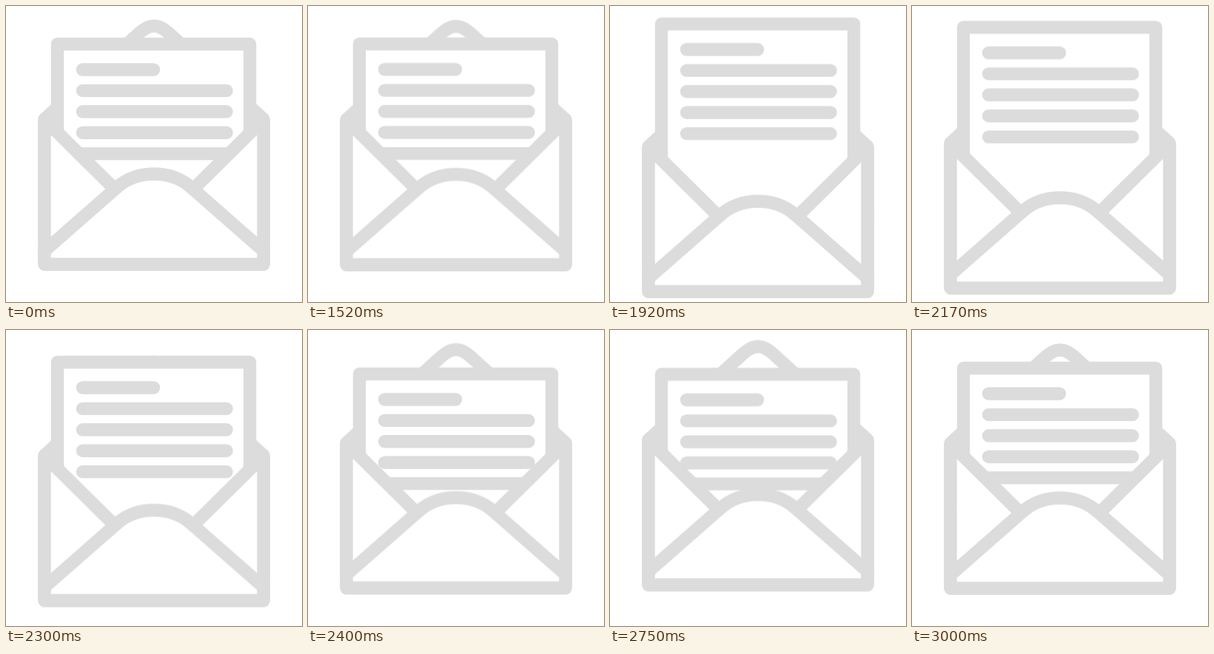
An HTML page for the animation above (3.02 s loop, 400 by 400 pixels).

```html
<!DOCTYPE html>
<html lang="en">
<head>
<meta charset="utf-8">
<title>Opening letter</title>
<style>
  html, body { margin: 0; width: 100%; height: 100%; overflow: hidden; background: #fff; }
  svg { display: block; width: 100%; height: 100%; }
  path { fill: #fff; stroke: #dcdcdc; stroke-width: 17.4; stroke-linecap: round; stroke-linejoin: round; }
  .line { fill: none; }
  .paper, .envelope { animation: 3020ms infinite; }
  .paper { --up: -27.8px; --down: 15.6px; }
  .envelope { --up: 37.5px; --down: -8.8px; }
  .paper, .envelope { animation-name: bounce; }

  /* rest, pull apart, squeeze together, settle */
  @keyframes bounce {
    0% { transform: translateY(0); animation-timing-function: linear; }
    49.83% { transform: translateY(0); animation-timing-function: cubic-bezier(.17, 0, .2, 1); }
    66.56% { transform: translateY(var(--up)); animation-timing-function: cubic-bezier(.6, 0, .67, 1); }
    83.28% { transform: translateY(var(--down)); animation-timing-function: cubic-bezier(.33, 0, .67, 1); }
    99.67%, 100% { transform: translateY(0); }
  }
</style>
</head>
<body>
<svg viewBox="0 0 400 400">
  <g class="envelope">
    <path d="M52 153 L174 42 C182 34.5 190 27 200 27 S218 34.5 226 42 L348 153 V349 H52 Z"/>
  </g>
  <g class="paper">
    <path d="M69.5 310 V51.5 H329.5 V310"/>
    <path class="line" d="M103.5 86 H199.5 M103.5 114.4 H298 M103.5 142.8 H298 M103.5 171.2 H298 M103.5 199.6 H298"/>
  </g>
  <g class="envelope">
    <path stroke-linejoin="round" d="M52 153.5 L144 244.5 L150 245 C163 233.5 181 227 200 227 S237 233.5 250 245 L256 244.5 L348 153.5 V349 H52 Z"/>
    <path class="line" d="M52 331 L150 245 M250 245 L348 331"/>
  </g>
</svg>
</body>
</html>
```
